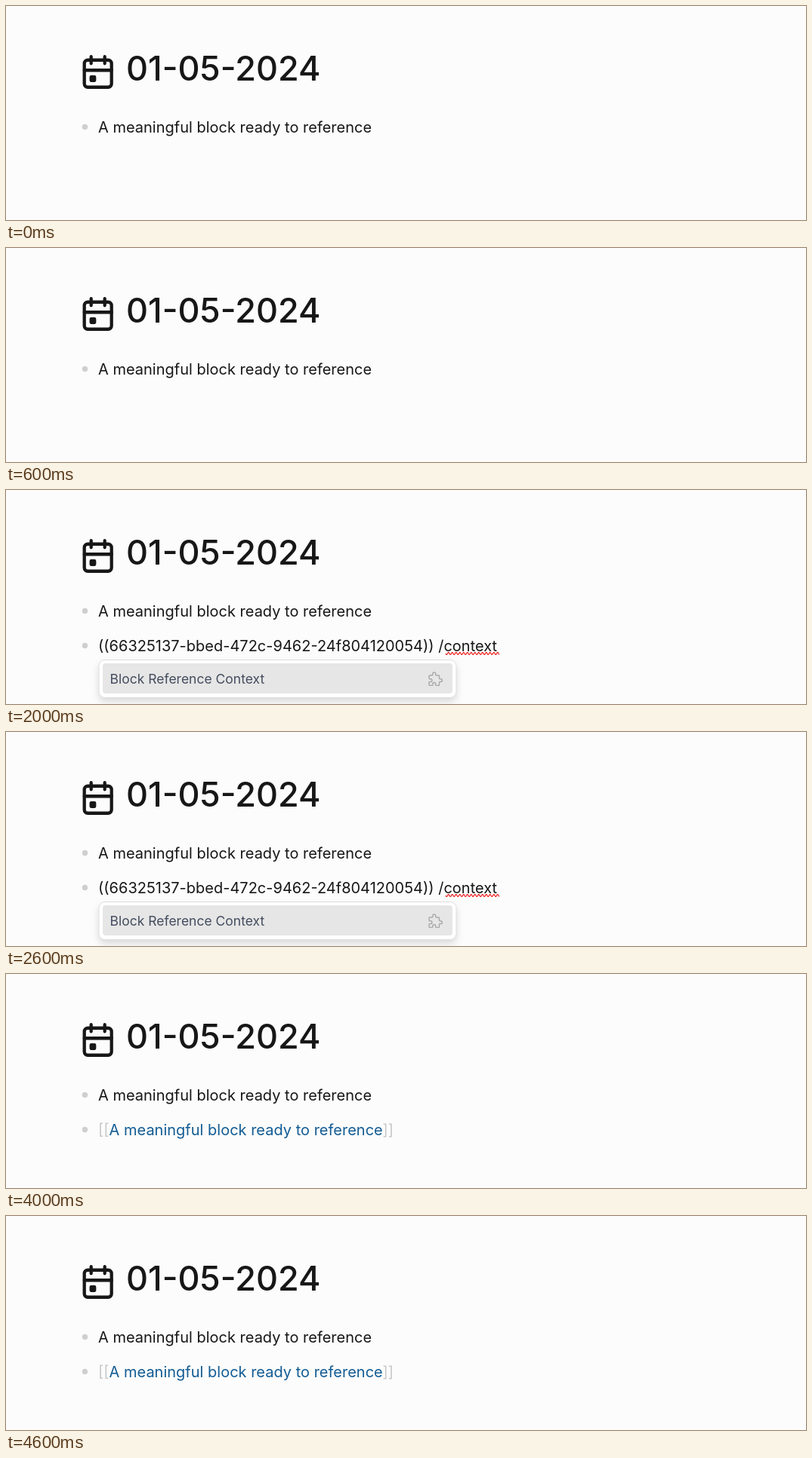
An HTML page that plays this animation: 1059x284 px, repeating every 5 s.

```html
<!DOCTYPE html>
<html lang="en">
<head>
<meta charset="utf-8">
<title>Block reference</title>
<style>
  html, body { margin: 0; width: 100%; height: 100%; overflow: hidden; background: #fcfcfc; }
  svg { display: block; width: 1059px; height: 284px; }
  text { font: 400 20px Inter, sans-serif; font-optical-sizing: none; fill: #171717; }
  .title { font-size: 45px; font-weight: 500; }
  .menu { font-size: 17.5px; fill: #434c5e; }
  .link { fill: #135c94; }
  .bracket { fill: #c8c8c8; }
  .bullet { fill: #cfcfcf; }
  .icon { fill: none; stroke-width: 1.9; stroke-linecap: round; stroke-linejoin: round; }
  .wave { fill: none; stroke: #f01818; stroke-width: 1.2; }
  .panel { fill: #fff; stroke: #dedede; filter: drop-shadow(0 5px 5px #0002); }
</style>
</head>
<body>
<svg viewBox="0 0 1059 284">
  <g class="icon" stroke="#171717" transform="translate(94.7 60.5) scale(2.25)">
    <rect x="4" y="5" width="16" height="16" rx="2"/>
    <path d="M16 3v4M8 3v4M4 11h16"/>
    <rect x="8" y="15" width="2" height="2"/>
  </g>
  <text class="title" x="159" y="99">01-05-2024</text>
  <circle class="bullet" cx="104.5" cy="160.5" r="3.7"/>
  <text x="122" y="168">A meaningful block ready to reference</text>

  <circle class="bullet" cx="104.5" cy="206.5" r="3.7" data-steps="1234"/>
  <text x="122" y="214" data-steps="12">((66325137-bbed-472c-9462-24f804120054))<tspan data-steps="2"> /context</tspan></text>

  <g data-steps="1">
    <rect x="504" y="147" width="100" height="28" rx="3.5" fill="#fff1a8"/>
    <text x="509.5" y="168">CTRL + V</text>
  </g>

  <g data-steps="2">
    <path class="wave" data-wave="582 653"/>
    <rect class="panel" x="123" y="225.5" width="473" height="50" rx="8"/>
    <rect x="128" y="230" width="463" height="40" rx="4" fill="#e6e6e6"/>
    <text class="menu" x="137.5" y="257">Block Reference Context</text>
    <path class="icon" stroke="#a9a9a9" style="stroke-width:1.5" transform="translate(557.2 239.2) scale(.96)"
      d="M4 7h3a1 1 0 0 0 1-1v-1a2 2 0 0 1 4 0v1a1 1 0 0 0 1 1h3a1 1 0 0 1 1 1v3a1 1 0 0 0 1 1h1a2 2 0 0 1 0 4h-1a1 1 0 0 0-1 1v3a1 1 0 0 1-1 1h-3a1 1 0 0 1-1-1v-1a2 2 0 0 0-4 0v1a1 1 0 0 1-1 1h-3a1 1 0 0 1-1-1v-3a1 1 0 0 1 1-1h1a2 2 0 0 0 0-4h-1a1 1 0 0 1-1-1v-3a1 1 0 0 1 1-1"/>
  </g>

  <g data-steps="3">
    <text x="122" y="214">[A meaningful block ready to reference](66325137-bbed-472c-9462-24f804120054)</text>
    <path class="wave" data-wave="149 252"/>
    <path class="wave" data-wave="315 367"/>
    <path class="wave" data-wave="374 392"/>
    <path class="wave" data-wave="399 489"/>
    <path d="M929.5 195v24" stroke="#000"/>
  </g>

  <text x="122" y="214" data-steps="4"><tspan class="bracket">[[</tspan><tspan class="link">A meaningful block ready to reference</tspan><tspan class="bracket">]]</tspan></text>
</svg>
<script>
  const STEP = 1000, STEPS = 5;
  const parts = [...document.querySelectorAll('[data-steps]')];

  // Spelling underline: a small sine wave between two x positions.
  for (const path of document.querySelectorAll('[data-wave]')) {
    const [from, to] = path.dataset.wave.split(' ').map(Number);
    const points = [];
    for (let x = from; x <= to; x += 0.5) {
      points.push(`${x} ${(217 + 1.4 * Math.sin((x - from) * 2 * Math.PI / 5)).toFixed(2)}`);
    }
    path.setAttribute('d', 'M' + points.join('L'));
  }

  function draw(now) {
    const step = Math.floor(now / STEP) % STEPS;
    for (const part of parts) {
      part.style.display = part.dataset.steps.includes(step) ? '' : 'none';
    }
    requestAnimationFrame(time => draw(time - start));
  }

  const start = performance.now();
  draw(0);
</script>
</body>
</html>
```
